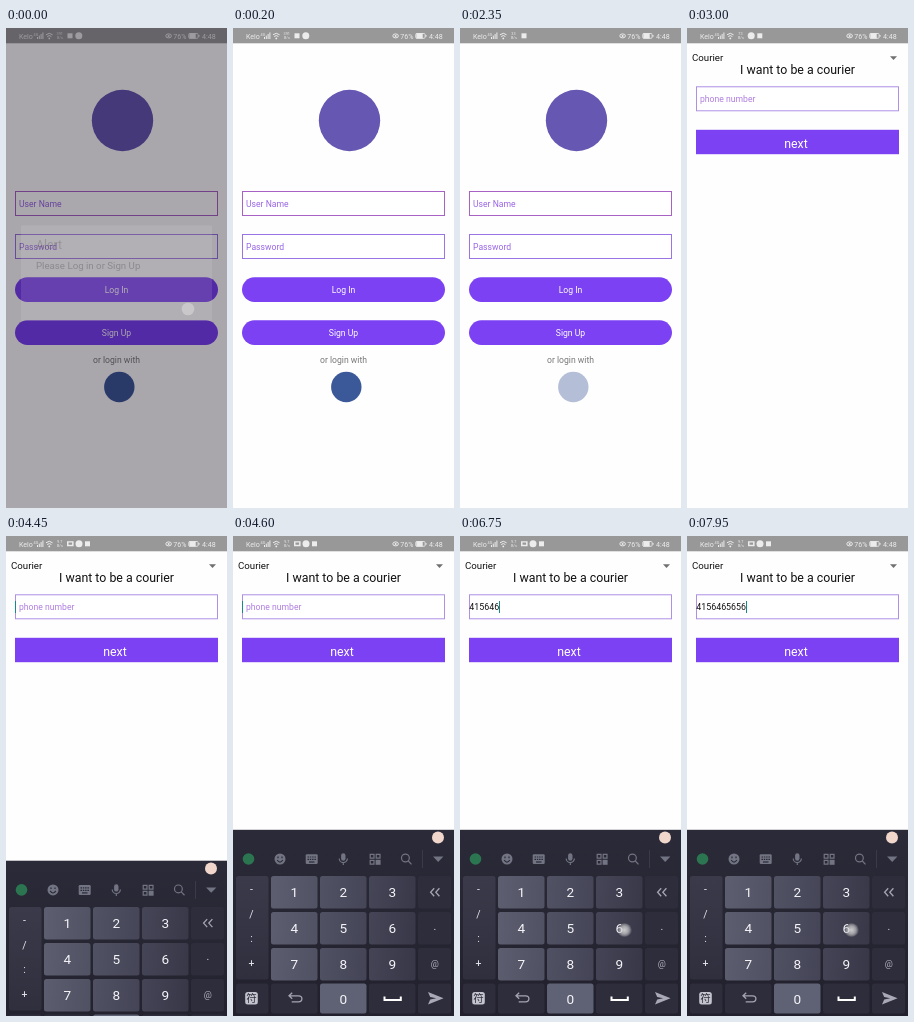
Animation of 221 by 480 pixels, one loop 8000 ms. Source, as an HTML page:

```html
<!DOCTYPE html>
<html lang="en">
<head>
<meta charset="utf-8">
<title>Courier sign-up</title>
<style>
html, body { margin: 0; width: 100%; height: 100%; overflow: hidden; background: #fff; }
#stage { position: relative; width: 221px; height: 480px; overflow: hidden; background: #fefefe; }
svg { position: absolute; left: 0; top: 0; display: block; }
text, .typed { font-family: Roboto, sans-serif; }
text { font-size: 8.64px; }
.mid { text-anchor: middle; }
.white { fill: #fff; }
.big { font-size: 12.35px; }
.box { fill: #fff; stroke: #9a74e4; }
.hint { fill: #9a66e6; }
.btn { fill: #7b41f3; }

/* every track shares one 8 s loop */
.anim { animation: 8s linear infinite; }
.hard { animation-timing-function: step-end; }

.dialog { animation-name: dialog; }
@keyframes dialog { 0% { opacity: 1; } 2.5%, 100% { opacity: 0; } }

.social { animation-name: social; }
@keyframes social { 0%, 21.5% { opacity: 1; } 23.6%, 28.7% { opacity: .2; } 31.8%, 100% { opacity: 1; } }

.courier { animation-name: courier; }
@keyframes courier { 0%, 35% { opacity: 0; } 37.4%, 100% { opacity: 1; } }

.keyboard { animation-name: keyboard; }
@keyframes keyboard {
  0%, 53.2% { transform: translateY(190px); animation-timing-function: ease-out; }
  56.9%, 100% { transform: none; }
}

.tray1 { animation-name: tray1; }
.tray2 { animation-name: tray2; }
.tray3 { animation-name: tray3; }
.tray4 { animation-name: tray4; }
@keyframes tray1 { 0% { opacity: 1; } 22%, 100% { opacity: 0; } }
@keyframes tray2 { 0% { opacity: 0; } 22% { opacity: 1; } 31%, 100% { opacity: 0; } }
@keyframes tray3 { 0% { opacity: 0; } 31% { opacity: 1; } 54%, 100% { opacity: 0; } }
@keyframes tray4 { 0% { opacity: 0; } 54%, 100% { opacity: 1; } }

.ask { animation-name: ask; }
@keyframes ask { 0% { opacity: 1; } 69%, 100% { opacity: 0; } }

.typed {
  position: absolute; left: 9.3px; top: 65px; height: 12px;
  overflow: hidden; white-space: nowrap; color: #111;
  font-size: 8.85px; line-height: 12px;
  border-right: 1px solid transparent;
  animation-name: typing, caret;
}
@keyframes typing {
  0% { width: 0; }
  69% { width: 1ch; } 72.5% { width: 2ch; } 75.5% { width: 3ch; }
  79% { width: 4ch; } 81.5% { width: 5ch; } 84% { width: 6ch; }
  90.5% { width: 7ch; } 93% { width: 8ch; } 96% { width: 9ch; }
  99%, 100% { width: 10ch; }
}
@keyframes caret {
  0% { border-color: transparent; }
  55% { border-color: #168a86; }
  61.2% { border-color: transparent; }
  66.9%, 100% { border-color: #168a86; }
}

.touch { animation-name: touch; }
@keyframes touch {
  0% { opacity: 0; transform: translate(66px, 394px); }
  67% { opacity: 1; transform: translate(66px, 394px); }
  69.5% { opacity: 0; transform: translate(66px, 359px); }
  70.8% { opacity: 1; transform: translate(66px, 359px); }
  73.2% { opacity: 0; transform: translate(115px, 394px); }
  74% { opacity: 1; transform: translate(115px, 394px); }
  76% { opacity: 0; transform: translate(164.5px, 394px); }
  77.5% { opacity: 1; transform: translate(164.5px, 394px); }
  79.5% { opacity: 0; transform: translate(66px, 394px); }
  80% { opacity: 1; transform: translate(66px, 394px); }
  82% { opacity: 0; transform: translate(164.5px, 394px); }
  82.8% { opacity: 1; transform: translate(164.5px, 394px); }
  85.5% { opacity: 0; transform: translate(115px, 394px); }
  90% { opacity: 1; transform: translate(115px, 394px); }
  91.4% { opacity: 0; transform: translate(164.5px, 394px); }
  92% { opacity: 1; transform: translate(164.5px, 394px); }
  93.6% { opacity: 0; transform: translate(115px, 394px); }
  94.5% { opacity: 1; transform: translate(115px, 394px); }
  96.5% { opacity: 0; transform: translate(164.5px, 394px); }
  97.8%, 100% { opacity: 1; transform: translate(164.5px, 394px); }
}

.status text { font-size: 7.1px; fill: #ececec; }
.status .tiny { font-size: 3.8px; }
.tool { fill: none; stroke: #737483; stroke-width: 1.2; }
.tool .solid { fill: #737483; stroke: none; }
.keys text { fill: #f4f4f8; text-anchor: middle; }
.keys .digit { font-size: 13.6px; }
.keys .sign { font-size: 10.5px; fill: #e6e6ec; }
</style>
</head>
<body>
<div id="stage">
  <svg width="221" height="480" viewBox="0 0 221 480">
    <g class="login">
      <circle cx="116.5" cy="92.5" r="30.7" fill="#6557b2"/>
      <rect class="box" x="9.5" y="163.5" width="202" height="24" style="stroke:#a862c4"/>
      <text class="hint" x="13" y="179">User Name</text>
      <rect class="box" x="9.5" y="206.5" width="202" height="24"/>
      <text class="hint" x="13" y="222">Password</text>
      <rect class="btn" x="9" y="249.3" width="203" height="24.6" rx="12.3"/>
      <text class="mid white" x="110.5" y="264.8">Log In</text>
      <rect class="btn" x="9" y="292.3" width="203" height="24.6" rx="12.3"/>
      <text class="mid white" x="110.5" y="307.8">Sign Up</text>
      <text class="mid" x="110.5" y="335" fill="#777">or login with</text>
      <circle class="anim social" cx="113.3" cy="359" r="15.2" fill="#3b5998"/>
    </g>

    <g class="anim courier">
      <rect y="15" width="221" height="465" fill="#fefefe"/>
      <text x="5" y="33.2" fill="#111" style="font-size:9.7px">Courier</text>
      <path d="M203 28.3h7l-3.5 3.6z" fill="#707070"/>
      <text class="mid big" x="110.5" y="46" fill="#111">I want to be a courier</text>
      <rect class="box" x="9.5" y="58.8" width="202" height="24" style="stroke:#ae90e4"/>
      <text class="hint anim hard ask" x="13" y="74" style="fill:#b07fe0">phone number</text>
      <rect class="btn" x="9" y="101.8" width="203" height="24.4"/>
      <text class="mid big white" x="109" y="120.3">next</text>
    </g>
  </svg>

  <div class="typed anim hard">4156465656</div>

  <svg width="221" height="480" viewBox="0 0 221 480">
    <defs>
      <radialGradient id="glow">
        <stop offset="0" stop-color="#e8e8ea" stop-opacity=".85"/>
        <stop offset=".6" stop-color="#ccc" stop-opacity=".7"/>
        <stop offset="1" stop-color="#aaa" stop-opacity=".35"/>
      </radialGradient>
      <linearGradient id="board" x2="0" y2="1">
        <stop offset="0" stop-color="#2b2a38"/>
        <stop offset="1" stop-color="#21202c"/>
      </linearGradient>
      <linearGradient id="pad" gradientUnits="userSpaceOnUse" x1="38" y1="400" x2="182" y2="410">
        <stop offset="0" stop-color="#5c5e70"/>
        <stop offset=".5" stop-color="#4a4b5d"/>
        <stop offset="1" stop-color="#393849"/>
      </linearGradient>
      <linearGradient id="side" x2="0" y2="1">
        <stop offset="0" stop-color="#3b3a4a"/>
        <stop offset="1" stop-color="#302f3e"/>
      </linearGradient>
    </defs>

    <g class="status">
      <rect width="221" height="15.3" fill="#989898"/>
      <text x="13" y="10.5">Kelo</text>
      <text class="tiny" x="27.5" y="7.6">4G</text>
      <path d="M31.5 11V9M33.3 11V7.6M35.1 11V6M36.9 11V4.5" stroke="#ececec"/>
      <path d="M40 6.8q3.3-3 6.6 0M41.2 8.5q2.1-1.8 4.2 0" fill="none" stroke="#ececec"/>
      <circle cx="43.3" cy="10.4" r=".9" fill="#ececec"/>
      <text class="tiny" x="51" y="11.4">B/s</text>
      <g fill="#ececec">
        <g class="anim hard tray1">
          <text class="tiny" x="50.5" y="7">391</text>
          <rect x="61.5" y="5.3" width="5" height="5"/>
          <circle cx="72.8" cy="7.8" r="3.5"/>
        </g>
        <g class="anim hard tray2">
          <text class="tiny" x="51.3" y="7">33</text>
          <rect x="61.5" y="5.3" width="5" height="5"/>
        </g>
        <g class="anim hard tray3">
          <text class="tiny" x="51.3" y="7">73</text>
          <circle cx="64.2" cy="7.8" r="3.5"/>
          <rect x="70.3" y="5.3" width="5" height="5"/>
        </g>
        <g class="anim hard tray4">
          <text class="tiny" x="51" y="7">9.7</text>
          <path d="M61 5.2h6.6v5H61zM62.5 6.6v2.2h3.6V6.6z" fill-rule="evenodd"/>
          <circle cx="73" cy="7.8" r="3.5"/>
          <rect x="79" y="5.3" width="5" height="5"/>
        </g>
      </g>
      <ellipse cx="162.6" cy="7.9" rx="2.8" ry="2" fill="none" stroke="#ececec"/>
      <circle cx="162.6" cy="7.9" r="1" fill="#ececec"/>
      <text x="167.3" y="10.5">76%</text>
      <path d="M183.3 5.2h6.4v5.4h-6.4z" fill="#ececec"/>
      <rect x="182.7" y="5.5" width="9.4" height="4.8" rx="1" fill="none" stroke="#ececec" stroke-width=".8"/>
      <path d="M192.5 7h1v1.8h-1z" fill="#ececec"/>
      <text x="196" y="10.5">4:48</text>
    </g>

    <g class="anim keyboard">
      <rect y="293.8" width="221" height="187" fill="url(#board)"/>
      <circle cx="205" cy="301.5" r="6" fill="#f0d6cb"/>
      <circle cx="15.5" cy="323" r="5.8" fill="#2b7550"/>
      <g class="tool">
        <circle class="solid" cx="47" cy="323" r="5.5"/>
        <path d="M44.2 324q2.8 4.2 5.6 0M45 320.6v1.6M49 320.6v1.6" stroke="#292836"/>
        <rect class="solid" x="72.7" y="318.2" width="12" height="9.8" rx="1.2"/>
        <path d="M74.5 321h8.5M74.5 323.4h8.5" stroke="#292836" stroke-dasharray="1.5 .8"/>
        <path d="M76 326h5.5" stroke="#292836"/>
        <rect class="solid" x="108.1" y="317.3" width="4.4" height="7.4" rx="2.2"/>
        <path d="M106.2 322.5a4.1 4.1 0 0 0 8.2 0M110.3 326.6v2.4"/>
        <path d="M137.2 318.4h3.8v3.8h-3.8zM143.2 318.4h3.8v3.8h-3.8zM137.2 324.4h3.8v3.8h-3.8z"/>
        <rect class="solid" x="142.6" y="323.8" width="5" height="5"/>
        <circle cx="172.4" cy="322" r="3.9"/>
        <path d="M175.3 325l3.2 3.3"/>
        <path d="M189.5 314v18" stroke="#3b3a48" stroke-width="1"/>
        <path class="solid" d="M200 320.5h10.4l-5.2 5.4z"/>
      </g>
      <g class="keys" id="keys"></g>
      <g fill="none" stroke="#a5a5b2" stroke-width="1.3">
        <path d="M201.2 352.2l-3.6 4 3.6 4M206.4 352.2l-3.6 4 3.6 4"/>
        <path d="M59.2 456.8l-3.2 3 3.2 3M56.3 459.8h9.2q3.4 0 3.4 3t-3.4 3h-6.8"/>
        <path d="M151.5 460.5v3.6h16.3v-3.6" stroke="#fff" stroke-width="2"/>
        <path d="M195 456l15.6 6.2-15.6 6.2 2.2-5 6-1.2-6-1.2z" fill="#a9a9b8" stroke="none"/>
      </g>
    </g>

    <g class="anim hard touch"><circle r="6.8" fill="url(#glow)"/></g>

    <g class="anim dialog">
      <rect width="221" height="480" fill="#0a0012" opacity=".35"/>
      <rect x="15" y="197.5" width="191" height="95.5" rx="1.5" fill="#fff" opacity=".1"/>
      <g fill="#333">
        <text class="big" x="30" y="220.5" opacity=".22">Alert</text>
        <text x="30" y="240.5" opacity=".3" style="font-size:9.7px">Please Log in or Sign Up</text>
      </g>
      <circle cx="182" cy="281" r="6.3" fill="#fff" opacity=".3"/>
    </g>
  </svg>
</div>
<script>
const keys = document.getElementById('keys');

function add(tag, attrs, label = '') {
  const el = document.createElementNS('http://www.w3.org/2000/svg', tag);
  for (const name in attrs) el.setAttribute(name, attrs[name]);
  el.textContent = label;
  keys.append(el);
}
const key = (x, y, width, height, fill) => add('rect', { x, y, width, height, rx: 2.5, fill });
const sign = (label, x, y, style = '') => add('text', { x, y, class: 'sign', style }, label);

const dark = '#2e2d3c';
const rows = [340, 376, 412, 447.5];

key(3, 340, 32.5, 103.5, 'url(#side)');
key(3, 447.5, 32.5, 30, dark);
[...'-/:+'].forEach((c, i) => sign(c, 18.5, 357 + i * 24.7));
key(12.2, 456, 12.6, 12.6, '#c4c4ce');
sign('符', 18.5, 466, 'font-family:"Noto Sans CJK SC","Noto Sans CJK",sans-serif;fill:#2e2d3c');

rows.forEach((y, row) => {
  const height = row < 3 ? 32.5 : 30;
  for (let col = 0; col < 3; col++) {
    const x = 38 + col * 49;
    const isZero = row === 3 && col === 1;
    key(x, y, 46.5, height, row < 3 ? 'url(#pad)' : isZero ? '#5f6274' : dark);
    if (row < 3 || isZero) {
      add('text', { x: x + 23.3, y: y + height / 2 + 5, class: 'digit' }, isZero ? 0 : row * 3 + col + 1);
    }
  }
  key(185, y, 33, height, dark);
});
sign('.', 202, 393.5);
sign('@', 201.8, 431, 'font-size:9px;fill:#b4b4c0');
</script>
</body>
</html>
```
